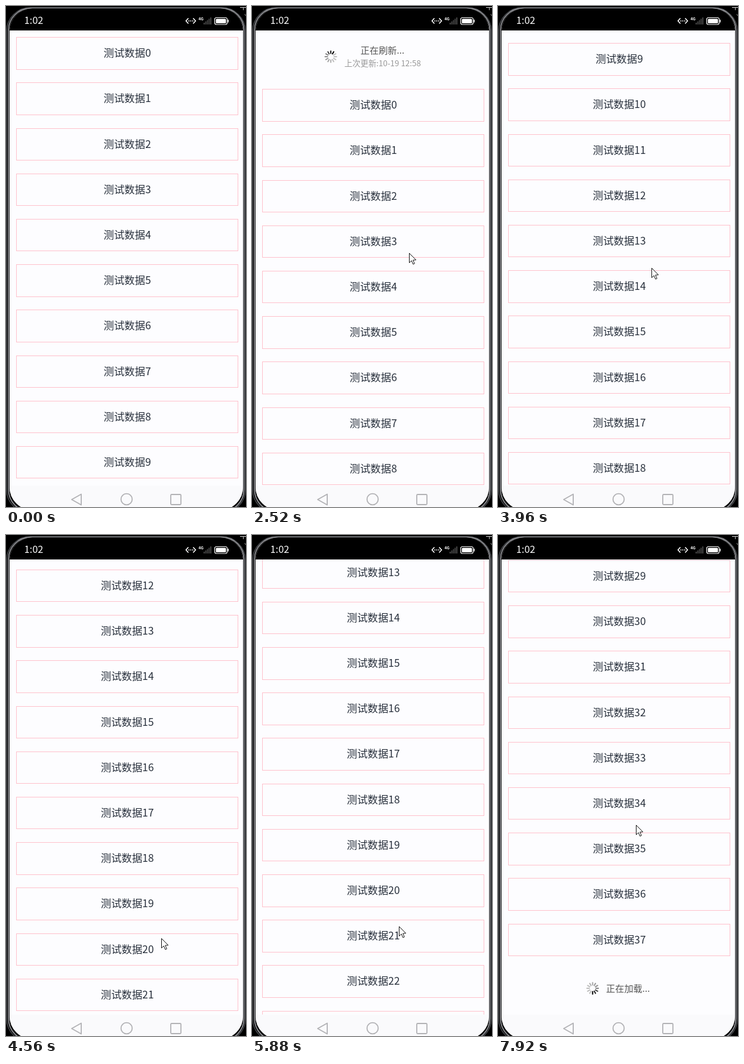
Write an HTML page with a canvas that moves like this. It is 402x840 px and loops after 8 s.

```html
<!DOCTYPE html>
<html lang="zh-CN">
<head>
<meta charset="utf-8">
<title>下拉刷新</title>
<style>
html, body { margin: 0; width: 100%; height: 100%; overflow: hidden; background: #000; }
canvas { display: block; width: 402px; height: 840px; }
</style>
</head>
<body>
<canvas id="stage"></canvas>
<script>
const W = 402, H = 840, LOOP = 8000, STEP = 120;
const TOP = 41, BOTTOM = 804, FIRST = 52.2, PITCH = 76.2, BOX = 54.45, PANEL = 87;
const FONT = '"Noto Sans CJK SC", "Noto Sans CJK", "Noto Sans", sans-serif';
const canvas = document.getElementById('stage');
const ctx = canvas.getContext('2d');
const dpr = window.devicePixelRatio || 1;
canvas.width = W * dpr;
canvas.height = H * dpr;

const linear = p => p;
const out = p => 1 - (1 - p) ** 3;
const inOut = p => p * p * (3 - 2 * p);

// Each key: [time, value, easing into it]
const pullKeys = [[600, 0], [1320, 87, inOut], [1560, 100, out], [1680, 100], [1800, 87, out],
  [2640, 87], [2880, 0, inOut]];
const scrollKeys = [[3360, 0], [3720, 270, inOut], [4560, 908.6, out], [4680, 913.8, out],
  [5040, 1000.8, inOut], [5760, 1000.8], [5880, 1007.13], [6120, 1290], [6840, 2133, out],
  [6960, 2133], [7320, 2220, inOut]];
const cursorX = [[480, 272], [1320, 268], [1680, 269], [2640, 262], [3120, 254], [3360, 262],
  [3720, 256], [4560, 260, inOut], [5040, 254], [5880, 246, inOut], [6120, 250],
  [6840, 275, inOut], [7320, 231, inOut]];
const cursorY = [[480, 112], [600, 125], [1320, 245, inOut], [1560, 270, out], [1680, 270],
  [2640, 420, inOut], [3120, 472], [3360, 650, inOut], [3720, 380, inOut], [4560, 676, inOut],
  [4680, 670], [5040, 546, inOut], [5760, 661, inOut], [5880, 656], [6120, 373],
  [6840, 610, inOut], [7320, 486, inOut]];
const arrowKeys = [[1260, 0], [1320, 8], [1500, 180, inOut]];

function track(keys, t) {
  if (t <= keys[0][0]) return keys[0][1];
  for (let i = 1; i < keys.length; i++) {
    const [t0, a] = keys[i - 1], [t1, b, ease = linear] = keys[i];
    if (t <= t1) return a + (b - a) * ease((t - t0) / (t1 - t0));
  }
  return keys[keys.length - 1][1];
}

function text(str, x, midY, size, color, align = 'center', weight = 400) {
  ctx.font = `${weight} ${size}px ${FONT}`;
  ctx.textAlign = align;
  ctx.fillStyle = color;
  ctx.fillText(str, x, midY + size * 0.365);
}

function line(points, color, width, closed = false) {
  ctx.beginPath();
  points.forEach(([x, y]) => ctx.lineTo(x, y));
  if (closed) ctx.closePath();
  ctx.strokeStyle = color;
  ctx.lineWidth = width;
  ctx.stroke();
}

function round(x, y, w, h, r) {
  ctx.beginPath();
  ctx.roundRect(x, y, w, h, r);
}

function outline(x, y, w, h, r, color, width) {
  round(x, y, w, h, r);
  ctx.strokeStyle = color;
  ctx.lineWidth = width;
  ctx.stroke();
}

function spinner(x, y, t) {
  const head = 6 + Math.floor(((t - 7920) / 1000 % 1 + 1) * 12);
  ctx.lineCap = 'round';
  for (let i = 0; i < 12; i++) {
    const age = ((head - i) % 12 + 12) % 12;
    const a = i * Math.PI / 6, s = Math.sin(a), c = -Math.cos(a);
    const shade = age < 3 ? age * 35 : Math.min(190, 130 + (age - 3) * 12);
    line([[x + s * 5.5, y + c * 5.5], [x + s * 9.6, y + c * 9.6]],
      `rgb(${shade},${shade},${shade})`, 2);
  }
  ctx.lineCap = 'butt';
}

function refreshPanel(pull, t) {
  const y = TOP + pull - PANEL / 2;
  const busy = t >= 1800;
  if (busy) {
    spinner(132, y + 0.5, t);
  } else {
    ctx.save();
    ctx.translate(131.8, y + 0.5);
    ctx.rotate(track(arrowKeys, t) * Math.PI / 180);
    line([[0, -10.5], [0, 10]], '#555', 1.4);
    line([[-6.5, 3.5], [0, 10], [6.5, 3.5]], '#555', 1.4);
    ctx.restore();
  }
  const title = busy ? '正在刷新...' : t >= 1260 ? '释放立即刷新' : '下拉可以刷新';
  text(title, 218.5, y - 10.5, 15.2, '#555');
  text('上次更新:10-19 12:58', 218.8, y + 11.5, 13.4, '#999');
}

function list(t) {
  const pull = track(pullKeys, t), scroll = track(scrollKeys, t);
  const count = t < 5640 ? 22 : 38;
  ctx.save();
  ctx.beginPath();
  ctx.rect(6, TOP, 391, BOTTOM - TOP);
  ctx.clip();
  if (pull > 0) refreshPanel(pull, t);
  for (let i = 0; i < count; i++) {
    const y = FIRST + i * PITCH + pull - scroll;
    if (y < -20 || y > BOTTOM) continue;
    const top = Math.round(y), bottom = Math.round(y + BOX);
    ctx.strokeStyle = '#ffc0cb';
    ctx.lineWidth = 1;
    ctx.strokeRect(17.5, top + 0.5, 371, bottom - top - 1);
    text('测试数据' + i, 203.2, top + 27, 17.4, '#28303c', 'center', 500);
  }
  const end = TOP + count * PITCH + pull - scroll;
  if (end < BOTTOM - 1) {
    const y = end + PANEL / 2;
    spinner(158.5, y, t);
    text('正在加载...', 181, y, 15.2, '#555', 'left');
  }
  ctx.restore();
}

function statusBar() {
  ctx.fillStyle = '#000';
  ctx.fillRect(6, 4, 391, TOP - 4);
  text('1:02', 30.5, 24.5, 16.4, '#fff', 'left', 500);
  line([[305.5, 20.5], [301.5, 25], [305.5, 29.5]], '#fff', 1.6);
  line([[313.5, 20.5], [317.5, 25], [313.5, 29.5]], '#fff', 1.6);
  ctx.fillStyle = '#fff';
  for (const x of [305.5, 308.7, 312]) ctx.fillRect(x, 24.2, 1.7, 1.7);
  text('4G', 322.5, 21.5, 6.5, '#fff', 'left', 700);
  ctx.fillStyle = '#4a4a4a';
  for (let i = 0; i < 5; i++) ctx.fillRect(331 + i * 2.8, 28 - i * 2.2, 1.8, 3 + i * 2.2);
  outline(349.5, 19.5, 21, 11.5, 3, '#fff', 1.2);
  ctx.fillStyle = '#fff';
  round(351.5, 21.5, 17, 7.5, 1.5);
  ctx.fill();
  ctx.fillRect(371.5, 23, 1.5, 4.5);
}

function navBar() {
  ctx.fillStyle = '#fafafc';
  ctx.fillRect(6, BOTTOM, 391, H - BOTTOM);
  const grey = '#b2b2b5';
  ctx.lineJoin = 'round';
  line([[110, 827.5], [126, 818.5], [126, 836.5]], grey, 1.8, true);
  ctx.lineJoin = 'miter';
  ctx.beginPath();
  ctx.arc(202, 827, 9.4, 0, Math.PI * 2);
  ctx.stroke();
  outline(276, 819, 17, 17, 1.5, grey, 1.8);
}

function cursor(t) {
  if (t < 480) return;
  ctx.save();
  ctx.translate(Math.round(track(cursorX, t)) + 0.5, Math.round(track(cursorY, t)) + 0.5);
  ctx.beginPath();
  [[0, 0], [0, 16], [3.7, 12.5], [6.4, 18.5], [8.8, 17.4], [6.2, 11.6], [11.2, 11.3]]
    .forEach(([x, y]) => ctx.lineTo(x, y));
  ctx.closePath();
  ctx.fillStyle = '#fff';
  ctx.fill();
  ctx.strokeStyle = '#111';
  ctx.lineWidth = 1;
  ctx.stroke();
  ctx.restore();
}

function draw(t) {
  ctx.setTransform(dpr, 0, 0, dpr, 0, 0);
  ctx.fillStyle = '#000';
  ctx.fillRect(0, 0, W, H);
  outline(1, 2.5, 400, 848, 40, '#4a4c50', 1.5);
  outline(4.2, 3.8, 394.3, 844, 37, '#8a8b8f', 2);
  ctx.save();
  round(6, 4, 391, 841, 38);
  ctx.clip();
  ctx.fillStyle = '#fdfdff';
  ctx.fillRect(0, 0, W, H);
  list(t);
  statusBar();
  navBar();
  ctx.restore();
  line([[392, 2.5], [402, 2.5]], '#ddd', 1);
  line([[397.5, 3], [397.5, 7]], '#bbb', 1);
  line([[399.5, 14], [402, 16]], '#aaa', 1);
  cursor(t);
}

const start = performance.now();
function tick() {
  const t = (performance.now() - start) % LOOP;
  draw(Math.floor(t / STEP) * STEP);
  requestAnimationFrame(tick);
}
tick();
</script>
</body>
</html>
```
